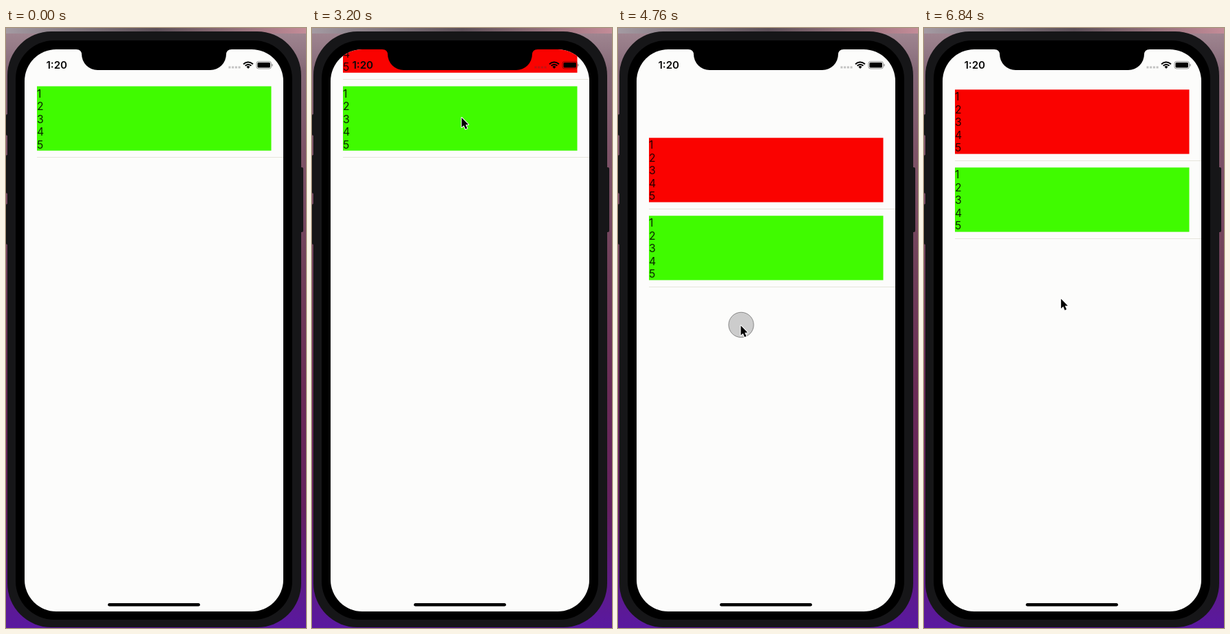
These frames come from a looping animation (436x870 px, 6940 ms). An HTML page with a canvas:

```html
<!DOCTYPE html>
<html lang="en">
<head>
<meta charset="utf-8">
<title>List pull</title>
<style>
  html, body { margin: 0; width: 100%; height: 100%; overflow: hidden; background: #4c2c3c; }
  canvas { display: block; }
</style>
</head>
<body>
<canvas id="stage" width="436" height="870"></canvas>
<script>
const c = document.getElementById('stage').getContext('2d');
const LOOP = 6940;
const REST = 84.5, ROW = 113;
const INSERT = 15, TOUCH = 76, RELEASE = 121.5;

const clamp = v => Math.max(0, Math.min(1, v));
const smooth = v => { v = clamp(v); return v * v * (3 - 2 * v); };
const mix = (a, b, k) => a + (b - a) * k;

function box(x, y, w, h, r, fill) {
  c.beginPath();
  c.roundRect(x, y, w, h, r);
  c.fillStyle = fill;
  c.fill();
}

function fade(x0, y0, x1, y1, ...stops) {
  const g = c.createLinearGradient(x0, y0, x1, y1);
  stops.forEach((s, i) => g.addColorStop(i / (stops.length - 1), s));
  return g;
}

// Pictures are held for 20, 100 and 20 ms in turn
function step(t) {
  const k = Math.floor(t / 140), r = t % 140;
  return Math.min(146, k * 3 + (r < 20 ? 0 : r < 120 ? 1 : 2));
}

const dragY = n => mix(173, 432, smooth((n - 78.6) / 24));
const touchY = n => dragY(n - 0.5);

// Top of the upper row while the list is dragged, then springs back
function listTop(n) {
  const held = Math.min(n, RELEASE);
  const travel = touchY(held) - 173;
  const extra = travel - ROW;
  if (extra <= 0) return REST + extra;
  const pull = extra * 0.57;
  const over = pull / (1 + pull / 815);
  const w = 0.1817 * (n - held);
  return REST + over * (1 + w) * Math.exp(-w);
}

function cursorAt(n) {
  if (n < 68) {
    const k = smooth((n - 52) / 16);
    return [mix(330, 217.5, k), mix(-30, 130, k)];
  }
  if (n < TOUCH) {
    const k = smooth((n - 68) / 8);
    return [mix(217.5, 178.5, k), mix(130, 173, k)];
  }
  const k = smooth((n - 134) / 13);
  return [mix(178.5, 199.5, k), mix(dragY(n), 392, k)];
}

function phone() {
  c.fillStyle = fade(0, 0, 0, 870, '#8a7480', '#7e5468', '#70405a', '#6a2c56', '#64205e', '#5a18a0');
  c.fillRect(0, 0, 436, 870);
  // Uneven light along the top edge
  c.fillStyle = fade(0, 0, 436, 0, '#a49aa2', '#5c4f58', '#c48c98');
  c.fillRect(0, 0, 436, 8);
  c.fillStyle = fade(0, 8, 0, 60, 'rgba(180,150,160,.5)', 'rgba(180,150,160,0)');
  c.fillRect(0, 8, 436, 52);
  const metal = '#161618';
  for (const [y, h] of [[125, 31], [184, 56], [255, 59]]) box(0, y, 5, h, 2, metal);
  box(426, 202, 6, 94, 2, metal);
  box(2, 5, 427, 864, 64, metal);
  box(14, 18, 402, 840, 56, '#000');
  box(27, 31, 376, 815, 46, '#fcfcfb');
}

function row(top, color) {
  c.fillStyle = color;
  c.fillRect(45, top, 340.5, 93.3);
  c.fillStyle = 'rgba(0,0,0,.85)';
  c.font = '15.7px Inter, Roboto, sans-serif';
  for (let i = 0; i < 5; i++) c.fillText(i + 1, 45, top + 16 + 18.5 * i);
  c.fillStyle = '#e6e5dc';
  c.fillRect(45, Math.round(top + 102.4), 358, 1);
}

function statusBar() {
  c.fillStyle = '#0a0a0a';
  c.font = '600 15px Inter, Roboto, sans-serif';
  c.fillText('1:20', 58.5, 59);

  c.fillStyle = 'rgba(60,60,60,.3)';
  for (let i = 0; i < 4; i++) c.fillRect(323.5 + 4.7 * i, 55.5, 3, 3);

  c.strokeStyle = '#000';
  c.lineWidth = 2;
  for (const r of [9.2, 5.7]) {
    c.beginPath();
    c.arc(352, 58.6, r, -Math.PI * 0.77, -Math.PI * 0.23);
    c.stroke();
  }
  c.beginPath();
  c.moveTo(352, 59);
  c.arc(352, 58.6, 3.4, -Math.PI * 0.77, -Math.PI * 0.23);
  c.fillStyle = '#000';
  c.fill();

  c.strokeStyle = 'rgba(0,0,0,.4)';
  c.lineWidth = 1;
  c.beginPath();
  c.roundRect(364, 48.5, 21.5, 10.5, 3);
  c.stroke();
  box(365.5, 50, 18.5, 7.5, 1.5, '#000');
  box(386.3, 52, 1.4, 3.6, 1, 'rgba(0,0,0,.4)');
}

function notch() {
  c.fillStyle = '#000';
  c.beginPath();
  c.moveTo(102, 30);
  c.lineTo(102, 31);
  c.quadraticCurveTo(110, 31, 110, 39);
  c.arcTo(110, 61, 134, 61, 23);
  c.lineTo(296, 61);
  c.arcTo(320, 61, 320, 39, 23);
  c.lineTo(320, 39);
  c.quadraticCurveTo(320, 31, 328, 31);
  c.lineTo(328, 30);
  c.fill();
}

function touch(y) {
  c.beginPath();
  c.arc(179, y, 18.2, 0, 7);
  c.fillStyle = 'rgba(187,187,187,.73)';
  c.fill();
  c.strokeStyle = 'rgba(90,90,90,.65)';
  c.lineWidth = 1;
  c.stroke();
}

function arrow(x, y) {
  const pts = [[0, 0], [0, 14], [3.2, 11.2], [5.5, 16.5], [8, 15.4], [5.7, 10.2], [9.8, 10]];
  c.beginPath();
  pts.forEach(([dx, dy]) => c.lineTo(x + dx, y + dy));
  c.closePath();
  c.lineJoin = 'round';
  c.strokeStyle = '#fff';
  c.lineWidth = 2;
  c.stroke();
  c.fillStyle = '#000';
  c.fill();
}

function draw(n) {
  phone();
  c.save();
  c.beginPath();
  c.roundRect(27, 31, 376, 815, 46);
  c.clip();
  const top = listTop(n);
  if (n >= INSERT) row(top, '#fa0200');
  row(top + ROW, '#40fb00');
  statusBar();
  c.restore();
  notch();
  box(148, 834, 134, 4.6, 2.3, '#000');
  if (n >= TOUCH && n < RELEASE) touch(touchY(n));
  if (n >= 52) arrow(...cursorAt(n));
}

const start = performance.now();
function tick() {
  draw(step((performance.now() - start) % LOOP));
  requestAnimationFrame(tick);
}
tick();
</script>
</body>
</html>
```
